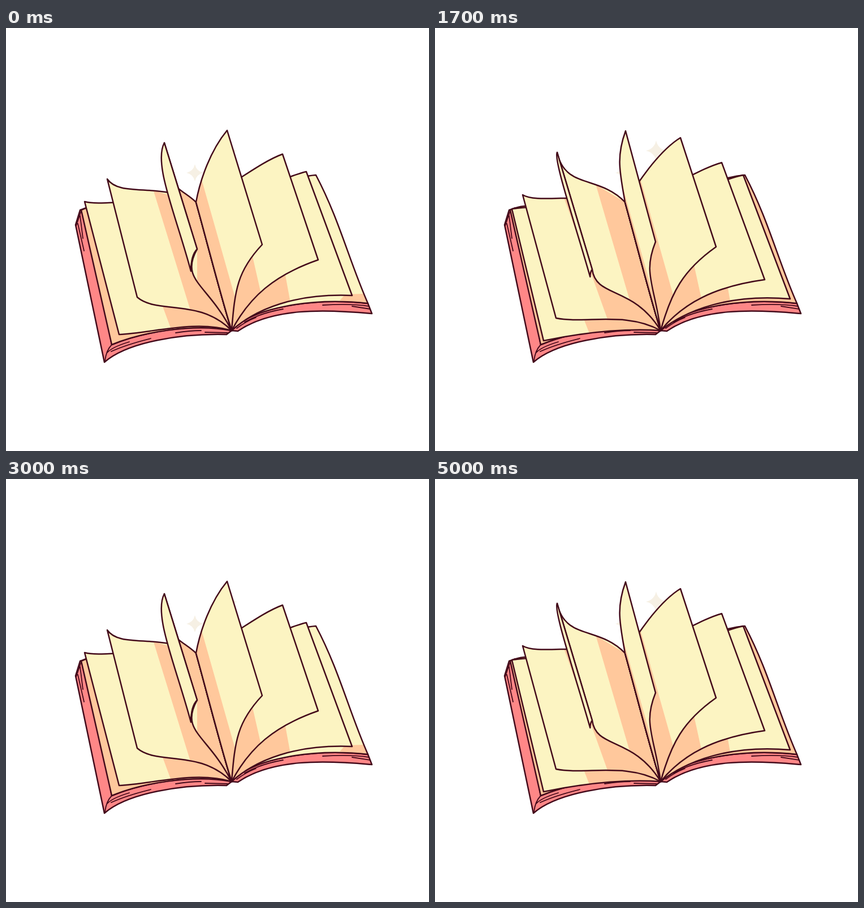
Write an HTML page that moves like this. It is 748 px wide and 748 px high and loops after 5110 ms.

```html
<!DOCTYPE html>
<html lang="en">
<head>
<meta charset="utf-8">
<title>Turning pages</title>
<style>
  html, body { margin: 0; width: 100%; height: 100%; overflow: hidden; background: #fff; }
  svg { display: block; width: 100vw; height: 100vh; }
  .ink { fill: none; stroke: #430a1a; stroke-width: 2.5; stroke-linecap: round; stroke-linejoin: round; }
  .thin { stroke-width: 1.8; }
  .paper { fill: #fcf4c2; }
  .shade { fill: #ffc89c; }
  .cover { fill: #ff8787; }
  .star { fill: #f6f0e4; }
</style>
</head>
<body>
<svg viewBox="0 0 748 748">
  <g id="back"></g>
  <g id="pages"></g>
</svg>
<script>
const LOOP = 5110, STEP = 100, LAST = 50;
const PHASES = 3, TURN = 18, UPRIGHT = 9;
const TOP = [336, 308], FOOT = [399, 535];

// Way of a sheet's free edge from right to left: top corner, bottom corner.
const edgeKeys = [
  [545, 260, 628, 479], [531, 254, 612, 473], [507, 238, 583, 445], [489, 223, 552, 410],
  [434, 194, 497, 387], [391, 181, 453, 383], [337, 182, 390, 378], [280, 203, 338, 391],
  [216, 220, 278, 427], [179, 267, 232, 476], [155, 295, 214, 513], [139, 307, 200, 542],
  [136, 320, 192, 553]
];
// Bend of the top and bottom edges away from a straight line, over a whole turn.
const topBend = [[24, 15, 30, -8], [-12, 8, -8, -13], [-6, -27, -26, 24], [-25, 0, -45, 0]];
const footBend = [[-30, -19, -28, -28], [-14, -18, -26, -8], [-3, -44, -25, 15], [6, -10, 4, -9]];

const lerp = (a, b, t) => a.map((v, i) => v + (b[i] - v) * t);
const add = (p, x, y) => [p[0] + x, p[1] + y];

function track(keys, pos) {
  const i = Math.min(keys.length - 2, Math.floor(pos));
  return lerp(keys[i], keys[i + 1], pos - i);
}

// Cubic from a to b, its controls pushed off the chord.
function bent(a, b, [x1, y1, x2, y2]) {
  return [a, add(lerp(a, b, 1 / 3), x1, y1), add(lerp(a, b, 2 / 3), x2, y2), b];
}

function pointAt(curve, t) {
  while (curve.length > 1) curve = curve.slice(1).map((p, i) => lerp(curve[i], p, t));
  return curve[0];
}

const path = (cls, d, extra = '') => `<path class="${cls}" d="${d}" ${extra}/>`;
const filled = (cls, d) => path(cls, d) + path('ink', d);

function star(x, y, r) {
  const q = r * 0.18;
  return path('star', `M${x} ${y - r}Q${x + q} ${y - q} ${x + r} ${y}Q${x + q} ${y + q} ${x} ${y + r}` +
    `Q${x - q} ${y + q} ${x - r} ${y}Q${x - q} ${y - q} ${x} ${y - r}Z`);
}

// The rolled-over rim that shows the underside of a sheet.
function rim(tip, corner, curl) {
  const fold = add(corner, -11 * curl, 39 * curl);
  const c1 = add(tip, -20 * curl, 37 * curl);
  const c2 = add(lerp(fold, tip, 0.44), -6 * curl, 0);
  return filled('paper', `M${tip}C${c1} ${c2} ${fold}Q${add(fold, 0, -28 * curl)} ${corner}Z`);
}

function sheet({ age, edge }) {
  const tip = edge.slice(0, 2), corner = edge.slice(2);
  const curl = age > UPRIGHT && age < 13 ? (13 - age) / 3 : 0;
  const pos = age / TURN * (topBend.length - 1);
  const push = (bend, by) => bend.map((v, i) => v + by[i] * curl);
  const top = bent(TOP, tip, push(track(topBend, pos), [0, 24, 0, 36]));
  const foot = bent(FOOT, corner, push(track(footBend, pos), [-16, 0, -26, 0]));

  const d = `M${TOP}C${top.slice(1)}L${corner}C${foot.slice(0, 3).reverse()}C380 475 356 380 ${TOP}Z`;
  const part = Math.max(curl, 0.22 + 0.045 * Math.abs(age - UPRIGHT));
  const shadow = `M${TOP}L${pointAt(top, part)}L${pointAt(foot, part)}L${corner[0]} 600L${FOOT}Z`;
  const id = 'clip' + age;
  return `<clipPath id="${id}"><path d="${d}"/></clipPath>` + path('paper', d) +
    path('shade', shadow, `clip-path="url(#${id})"`) + path('ink', d) +
    (curl ? rim(tip, corner, curl) : '');
}

function rightBase(lifted) {
  const d = `M${TOP}C430 290 515 262 548 260C590 340 606 410 640 487C540 476 440 495 402 531Z`;
  const strip = 'M600 471L632 470L640 487L590 482Z';
  return path(lifted ? 'shade' : 'paper', d) + (lifted ? '' : path('shade', strip)) + path('ink', d);
}

function drawBack() {
  const body = 'M123 348L131 322L142 318L187 560C240 538 330 522 396 533L402 531' +
    'C440 495 540 476 640 487L647 505C560 497 470 495 410 536L399 535L390 542' +
    'C310 540 215 555 174 591Z';
  const left = `M133 322Q145 316 158 315L${TOP}L${FOOT}C330 522 240 538 187 560Q159 435 133 322Z`;
  const lines = 'M127 346L138 394M131 332L136 372M124 350L133 323' +
    'M187 560Q177 570 175 589M179 574Q188 564 218 555M186 572Q212 560 256 549' +
    'M300 539Q325 535 345 535M352 538L392 539M408 531Q424 519 442 512M422 520Q450 504 490 497' +
    'M560 490Q610 487 642 492M612 492L644 497';
  back.innerHTML = star(391, 217, 18) + star(334, 256, 15) + filled('cover', body) +
    filled('shade', left) + path('ink thin', lines);
}

// One sheet follows another by a full cycle; the middle third lies halfway between keys.
function drawPages(phase) {
  const sheets = [];
  for (let age = phase; age <= TURN; age += PHASES) {
    const key = 2 * Math.floor(age / PHASES) + [0, 1, 1.5][phase];
    sheets.push({ age, edge: track(edgeKeys, key) });
  }
  const left = sheets.filter(s => s.age > UPRIGHT).reverse();
  const right = sheets.filter(s => s.age <= UPRIGHT);
  pages.innerHTML = rightBase(phase === 0) + [...left, ...right].map(sheet).join('');
}

const back = document.getElementById('back');
const pages = document.getElementById('pages');
let shown = -1;

function render(time) {
  const step = Math.min(LAST, Math.floor((time % LOOP) / STEP));
  const phase = (step + 1) % PHASES;
  if (phase !== shown) drawPages(shown = phase);
}

drawBack();
render(0);
const start = performance.now();
(function tick() {
  render(performance.now() - start);
  requestAnimationFrame(tick);
})();
</script>
</body>
</html>
```
